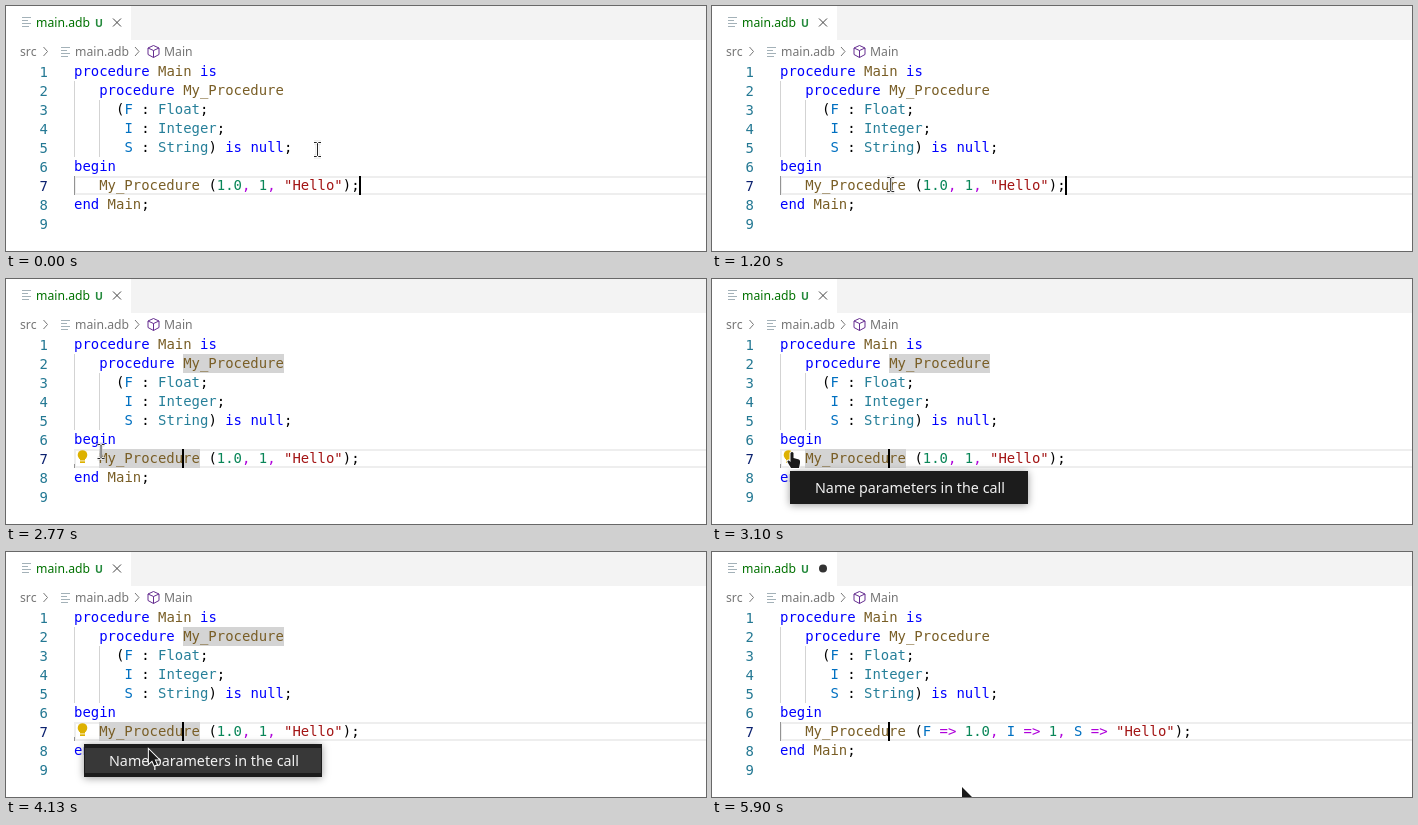
An HTML page with a canvas that plays this animation: 700x245 px, repeating every 6310 ms.

```html
<!DOCTYPE html>
<html lang="en">
<head>
<meta charset="utf-8">
<title>Naming call parameters</title>
<style>
  html, body { margin: 0; width: 100%; height: 100%; overflow: hidden; background: #fff; }
  canvas { display: block; }
</style>
</head>
<body>
<canvas id="stage" width="700" height="245"></canvas>
<script>
const ctx = document.getElementById('stage').getContext('2d');
const LOOP = 6310, LEFT = 68, CHAR = 8.4, LINE = 19, TOP = 56;
const CODE = '13.95px "DejaVu Sans Mono", monospace';
const UI = '12.2px "Noto Sans", sans-serif';
const MENU_OPEN = 3040, MENU_CLOSE = 4600, EDIT = 4640, RECOLOR = 4870;

const source = [
  'procedure Main is',
  '   procedure My_Procedure',
  '     (F : Float;',
  '      I : Integer;',
  '      S : String) is null;',
  'begin',
  '   My_Procedure (1.0, 1, "Hello");',
  'end Main;',
  ''
];
const namedCall = '   My_Procedure (F => 1.0, I => 1, S => "Hello");';

// Times when the caret is visible: [on, off]
const caretOn = [[0, 200], [700, 1230], [1670, 2170], [2670, EDIT], [5100, 5600], [5870, LOOP]];

// Pointer moves: [start, end, x0, y0, x1, y1, arc height]
const moves = [
  [670, 1270, 311.5, 143.5, 177, 179, 0],
  [1340, 1370, 177, 179, 175.5, 180, 0],
  [2130, 3040, 175.5, 180, 80, 174, 3],
  [3600, 4400, 80, 174, 160, 204, 0],
  [4600, 4700, 160, 204, 164.5, 208, 0],
  [4720, 5150, 164.5, 208, 200, 262, 0],
  [5840, 5900, 252, 252, 250, 235, 0]
];

const between = (t, a, b) => t >= a && t < b;
const ease = u => u * u * u * (u * (u * 6 - 15) + 10);
const column = c => LEFT + c * CHAR;
const lineTop = n => TOP + (n - 1) * LINE;

function rect(x, y, w, h, color) {
  ctx.fillStyle = color;
  ctx.fillRect(x, y, w, h);
}

function text(s, x, y, color, font) {
  ctx.font = font;
  ctx.fillStyle = color;
  ctx.fillText(s, x, y);
}

function disc(x, y, r, color) {
  ctx.fillStyle = color;
  ctx.beginPath();
  ctx.arc(x, y, r, 0, 7);
  ctx.fill();
}

function stroke(d, x, y, color, width = 1) {
  ctx.save();
  ctx.translate(x, y);
  ctx.strokeStyle = color;
  ctx.lineWidth = width;
  ctx.stroke(new Path2D(d));
  ctx.restore();
}

function outlined(d, x, y) {
  stroke(d, x, y, '#fff', 2);
  ctx.save();
  ctx.translate(x, y);
  ctx.fillStyle = '#1a1a1a';
  ctx.fill(new Path2D(d));
  ctx.restore();
}

function tokenColor(token, inCall, t) {
  if (/^(procedure|is|null|begin|end)$/.test(token)) return '#0000ff';
  if (/^(Float|Integer|String)$/.test(token)) return '#267f99';
  if (/^(Main|My_Procedure)$/.test(token)) return '#795e26';
  if (token[0] === '"') return '#a31515';
  if (/^\d/.test(token)) return '#098658';
  if (token === ',') return '#af00db';
  const plain = inCall && t < RECOLOR;
  if (/^[FIS]$/.test(token)) return plain ? '#000' : '#0070c1';
  if (token === '=>') return plain ? '#000' : '#af00db';
  return '#000';
}

function drawLine(line, n, t) {
  const base = lineTop(n) + 14;
  text(n, 33.5, base + 0.5, n === 7 ? '#0b216f' : '#237893', CODE);
  for (const m of line.matchAll(/"[^"]*"|\d[\d.]*|\w+|=>|\S/g))
    text(m[0], column(m.index), base, tokenColor(m[0], n === 7, t), CODE);
}

function drawHeader(t) {
  const fileIcon = 'M0 .5H9 M0 3.5H6 M0 6.5H9 M0 9.5H7';
  const chevron = 'M0 0L4 4.5L0 9';
  rect(125, 0, 575, 34, '#f3f3f3');
  stroke(fileIcon, 16, 11, '#a3b1b8');
  text('main.adb', 30, 21, '#007100', UI);
  text('U', 89, 21, '#258a3d', '600 10.5px "Noto Sans", sans-serif');
  if (t < EDIT) stroke('M0 0L8 8M8 0L0 8', 107, 12.5, '#424242');
  else disc(111, 16.5, 4, '#333');

  text('src', 14, 50, '#757575', UI);
  stroke(chevron, 37.5, 41, '#777');
  stroke(fileIcon, 55, 41, '#a3b1b8');
  text('main.adb', 69, 50, '#757575', UI);
  stroke(chevron, 129, 41, '#777');
  stroke('M0 -6L5.5 -3.5V3L0 6L-5.5 3V-3.5Z M-5.5 -3.5L0 -1L5.5 -3.5 M0 -1V6', 147.5, 45.5, '#652d90');
  text('Main', 158, 50, '#757575', UI);
}

function drawEditor(t) {
  const selected = between(t, 1900, EDIT);
  ctx.strokeStyle = '#eee';
  ctx.lineWidth = 2;
  ctx.strokeRect(69, 171, 640, 17);
  if (selected) {
    rect(93, lineTop(2) + LINE * 5, 101, LINE, '#d4d4d4');
    rect(177, lineTop(2), 101, LINE, '#d4d4d4');
  }
  rect(68, lineTop(2), 1, 4 * LINE, '#d3d3d3');
  rect(93, lineTop(3), 1, 3 * LINE, '#d3d3d3');
  rect(68, selected ? 185 : 170, 1, selected ? 4 : LINE, '#939393');

  source.forEach((line, i) => drawLine(i === 6 && t >= EDIT ? namedCall : line, i + 1, t));

  if (selected) {
    disc(76.5, 176, 4.8, '#ddb100');
    rect(74, 179, 5, 5, '#ddb100');
    rect(74, 181.5, 5, 0.8, '#fff');
  }
  if (caretOn.some(([on, off]) => between(t, on, off)))
    rect(t < 1500 ? 353 : 176, 170, 2, LINE, '#000');
}

function drawMenu(hover) {
  ctx.save();
  ctx.shadowColor = 'rgba(0,0,0,.4)';
  ctx.shadowBlur = 8;
  ctx.shadowOffsetY = 1;
  rect(78, 192, 238, 33, '#1c1c1c');
  ctx.restore();
  if (hover) rect(79, 196, 236, 25, '#383838');
  text('Name parameters in the call', 103, 214, '#f2f2f2', '14.3px "Noto Sans", sans-serif');
}

function pointerAt(t) {
  const [t0, t1, x0, y0, x1, y1, arc] = moves.filter(m => m[0] <= t).pop() || moves[0];
  const u = Math.min(1, Math.max(0, (t - t0) / (t1 - t0)));
  const e = ease(u);
  return [x0 + (x1 - x0) * e, y0 + (y1 - y0) * e - arc * Math.sin(Math.PI * u)];
}

function drawPointer(t, x, y) {
  if (between(t, 2130, MENU_CLOSE) && x < 86) {
    outlined('M-1.5 0Q0 -2 1.5 0V5L7 6.5Q8.5 7 8 10L7 15H-1L-4.5 9Q-5 7 -3 7.5L-1.5 9Z', x, y);
  } else if (between(t, MENU_OPEN, MENU_CLOSE) || t >= 5800) {
    outlined('M0 0V14L3.3 11L5.5 16L8 15L5.8 10H10Z', x, y);
  } else {
    const beam = 'M-3.5 -7H-1L0 -6L1 -7H3.5M0 -6V6M-3.5 7H-1L0 6L1 7H3.5';
    stroke(beam, x, y, 'rgba(0,0,0,.12)', 4);
    stroke(beam, x, y, '#fff', 2.6);
    stroke(beam, x, y, '#222');
  }
}

function draw(t) {
  const [x, y] = pointerAt(t);
  rect(0, 0, 700, 245, '#fff');
  drawHeader(t);
  drawEditor(t);
  if (between(t, MENU_OPEN, MENU_CLOSE)) drawMenu(y > 194);
  drawPointer(t, x, y);
}

const start = performance.now();
function tick() {
  draw((performance.now() - start) % LOOP);
  requestAnimationFrame(tick);
}
tick();
</script>
</body>
</html>
```
